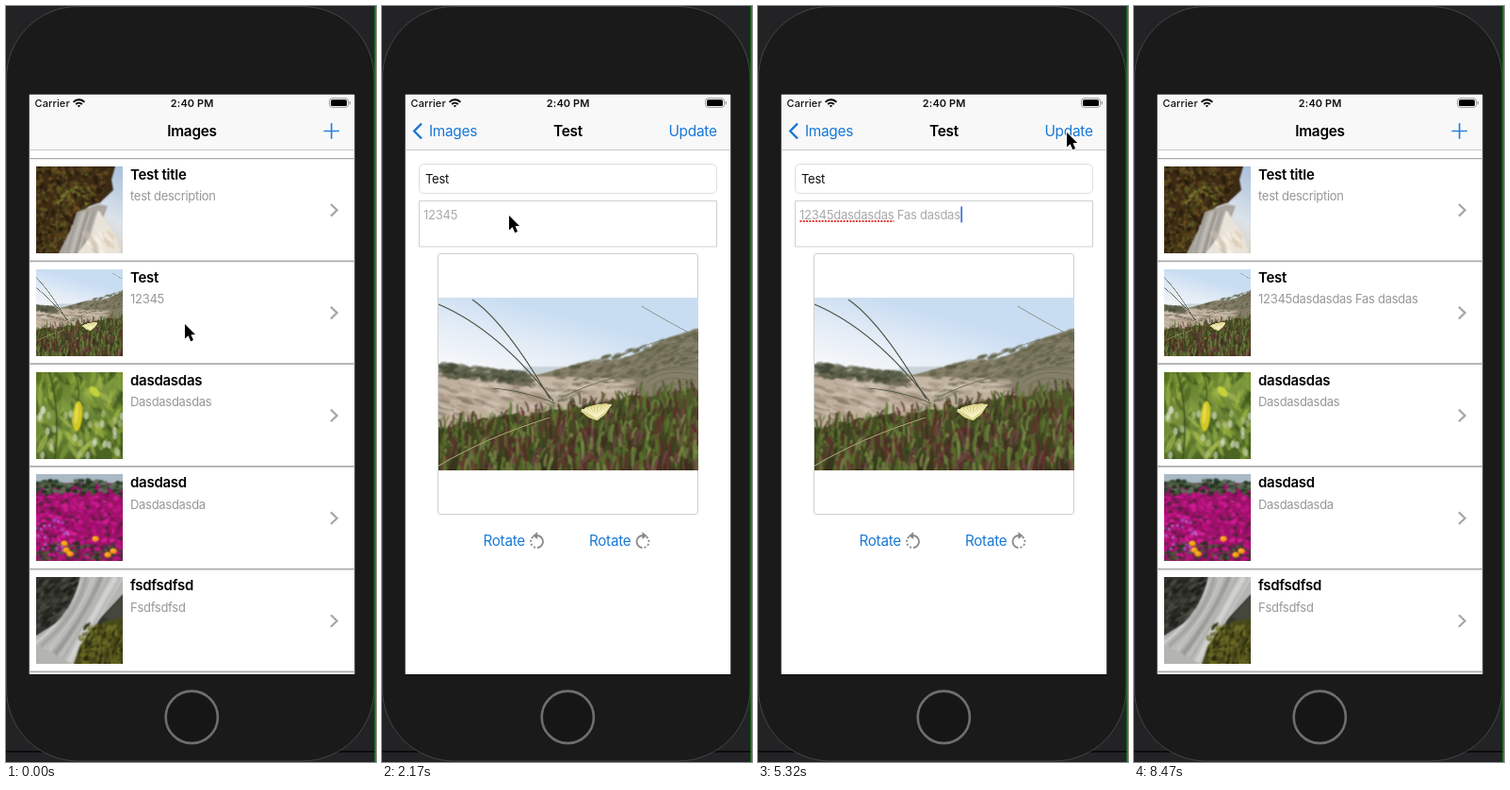
An HTML page with a canvas that plays this animation: 393x801 px, repeating every 8.54 s.

```html
<!DOCTYPE html>
<html lang="en">
<head>
<meta charset="utf-8">
<title>Image list</title>
<style>
html, body { margin: 0; width: 100%; height: 100%; overflow: hidden; background: #1a1a1a; }
canvas { display: block; width: 393px; height: 801px; }
</style>
</head>
<body>
<canvas id="stage"></canvas>
<script>
const W = 393, H = 801, LOOP = 8540;
const SX = 24.5, SY = 93.5, SW = 346, SH = 614.5, NAV = 153;
const BLUE = '#1878d6', FONT = 'Inter, "Open Sans", sans-serif';
const canvas = document.getElementById('stage');
const dpr = window.devicePixelRatio || 1;
canvas.width = W * dpr;
canvas.height = H * dpr;
const g = canvas.getContext('2d');

const clamp = v => Math.max(0, Math.min(1, v));
const mix = (a, b, k) => a + (b - a) * k;
const smooth = k => k * k * (3 - 2 * k);

function randomizer(seed) {
  return () => {
    seed = (seed * 1664525 + 1013904223) >>> 0;
    return seed / 4294967296;
  };
}

// ---------- pictures ----------
// Painted at double size; "paint" is softened, "sharp" goes on top as is.
function picture(w, h, seed, paint, sharp) {
  const make = () => {
    const c = document.createElement('canvas');
    c.width = w * 2;
    c.height = h * 2;
    return [c, c.getContext('2d')];
  };
  const [raw, p] = make(), [out, q] = make();
  const rnd = randomizer(seed);
  for (let i = 0; i < 5; i++) rnd();
  p.scale(2, 2);
  paint(p, rnd);
  q.drawImage(raw, 0, 0);
  q.filter = 'blur(1.6px)';
  q.drawImage(raw, 0, 0);
  q.filter = 'none';
  q.scale(2, 2);
  if (sharp) sharp(q);
  return out;
}

function gradient(p, x0, y0, x1, y1, colors) {
  const gr = p.createLinearGradient(x0, y0, x1, y1);
  colors.forEach((c, i) => gr.addColorStop(i / (colors.length - 1), c));
  return gr;
}

function poly(p, color, pts) {
  p.fillStyle = color;
  p.beginPath();
  for (let i = 0; i < pts.length; i += 2) p.lineTo(pts[i], pts[i + 1]);
  p.fill();
}

function blob(p, color, x, y, rx, ry, angle = 0) {
  p.fillStyle = color;
  p.beginPath();
  p.ellipse(x, y, rx, ry, angle, 0, 7);
  p.fill();
}

function blade(p, color, w, x0, y0, cx, cy, x1, y1) {
  p.strokeStyle = color;
  p.lineWidth = w;
  p.beginPath();
  p.moveTo(x0, y0);
  p.quadraticCurveTo(cx, cy, x1, y1);
  p.stroke();
}

// scatter(rnd, n, colors, draw) calls draw with a random colour
function scatter(rnd, n, colors, draw, alpha = 1) {
  for (let i = 0; i < n; i++) {
    const c = colors[rnd() * colors.length | 0];
    p_alpha = alpha;
    draw(c, i / n);
  }
}
let p_alpha = 1;

function paintDune(p, rnd) {
  p.fillStyle = gradient(p, 60, 0, 40, 76, ['#c9ddf2', '#e3ecf6', '#f5f7fa']);
  p.fillRect(0, 0, 276, 183);
  p.fillStyle = '#c9d3da';
  p.fillRect(90, 73, 90, 10);
  poly(p, '#bfb09e', [0, 76, 60, 80, 130, 82, 276, 70, 276, 183, 0, 183]);
  poly(p, '#857e69', [100, 83, 150, 70, 195, 65, 222, 54, 245, 42, 276, 33, 276, 120, 200, 98, 150, 84]);
  p.globalAlpha = 0.6;
  scatter(rnd, 340, ['#5f6247', '#77725a', '#938a74', '#4e5337', '#6b684f'], c => {
    const x = 125 + rnd() * 151, top = 77 - (x - 125) * 0.29;
    blob(p, c, x, top + rnd() * 34, 4, 1.4, -0.35);
  });
  scatter(rnd, 60, ['#cabba9', '#b09f8b', '#d3c7b7'], c => {
    blob(p, c, 95 + rnd() * 110, 86 + rnd() * 16, 9, 1.6, 0.1);
  });
  scatter(rnd, 220, ['#4c523d', '#5e624b', '#3f4633', '#737059'], c => {
    const x = rnd() * 100;
    blob(p, c, x, 69 + x * 0.11 + rnd() * 14, 4, 2);
  });
  scatter(rnd, 110, ['#cbbdab', '#a3917d', '#877a68', '#d6cabb'], c => {
    blob(p, c, rnd() * 120, 90 + rnd() * 34, 7, 1.8, 0.25);
  });
  p.globalAlpha = 1;
  const edge = x => 126 - 42 * x / 276;
  p.fillStyle = gradient(p, 0, 84, 0, 183, ['#56602f', '#454a24', '#33331b']);
  p.beginPath();
  p.moveTo(0, 183);
  for (let x = 0; x <= 276; x += 6) p.lineTo(x, edge(x) + 8 + rnd() * 6);
  p.lineTo(276, 183);
  p.fill();
  p.lineCap = 'round';
  const leaves = ['#546c2a', '#66803a', '#3d4f20', '#67352f', '#74444a', '#7d9049', '#3d2b20', '#343d1c', '#59712e', '#5c2c28'];
  scatter(rnd, 900, leaves, (c, k) => {
    const x = rnd() * 280, y = mix(edge(x) + 6, 196, k) + rnd() * 8;
    const len = 7 + 10 * k + rnd() * 6, lean = (rnd() - 0.4) * 8;
    p.globalAlpha = 0.72;
    blade(p, c, 1.8 + 2 * k, x, y, x - lean * 0.3, y - len * 0.5, x + lean, y - len);
  });
  p.globalAlpha = 1;
}

function paintReeds(p) {
  const reed = '#4d5345';
  blade(p, reed, 1.2, 0, 7, 64, 34, 122, 109);
  blade(p, reed, 1.1, 36, 2, 72, 27, 119, 108);
  blade(p, '#5f634b', 0.9, 58, 96, 90, 98, 125, 112);
  blade(p, '#a39b72', 1.1, 0, 178, 50, 148, 118, 127);
  blade(p, '#6f7154', 0.9, 276, 76, 200, 72, 130, 106);
  for (let i = 0; i < 9; i++) {
    blade(p, '#6a6d51', 0.6, 276, 40 + i * 7, 240, 38 + i * 6, 185 + i * 6, 66 + i * 4);
  }
  blade(p, '#777c66', 0.7, 216, 9, 245, 26, 276, 42);
  poly(p, '#dcd58c', [151, 120, 157, 116, 168, 113, 178, 112, 184, 113, 178, 123, 169, 130, 160, 127]);
  for (let i = 0; i < 9; i++) blade(p, '#f6f1c4', 1.2, 168, 127, 160 + i * 2, 121, 152 + i * 4, 118 - i * 0.6);
}

const dune = picture(276, 183, 7, paintDune, paintReeds);

const cliff = picture(92, 92, 11, (p, rnd) => {
  p.fillStyle = gradient(p, 92, 0, 40, 92, ['#a9c0dc', '#dce3ea', '#d8c5a8']);
  p.fillRect(0, 0, 92, 92);
  poly(p, '#3c2a15', [0, 0, 84, 0, 80, 14, 82, 25, 68, 38, 46, 46, 38, 62, 28, 92, 0, 92]);
  p.globalAlpha = 0.8;
  scatter(rnd, 520, ['#5a3f1c', '#2a1c0c', '#69501f', '#453f18', '#1f170a', '#5c5926'], c => {
    const y = rnd() * 90, lim = y < 38 ? 78 - y * 0.25 : 56 - (y - 38) * 0.5;
    blob(p, c, rnd() * lim, y, 1 + rnd() * 2.4, 0.8 + rnd() * 1.4, rnd() * 3);
  });
  p.globalAlpha = 1;
  poly(p, '#aaa69f', [47, 47, 66, 40, 76, 42, 66, 68, 74, 92, 24, 92, 34, 72]);
  p.globalAlpha = 0.5;
  scatter(rnd, 40, ['#c9c6c0', '#8f8c86', '#d8d6d1'], c => {
    const x = 34 + rnd() * 28;
    blade(p, c, 1.4, x + 8, 48, x + 2, 65, x - 5, 92);
  });
  p.globalAlpha = 1;
  poly(p, '#eae3d9', [66, 46, 74, 58, 86, 78, 90, 92, 44, 92, 58, 74]);
  p.globalAlpha = 0.5;
  scatter(rnd, 24, ['#fff8ee', '#d9c5a5', '#cfc3b5'], c => {
    blob(p, c, 52 + rnd() * 28, 72 + rnd() * 18, 6, 2, 0.9);
  });
  scatter(rnd, 40, ['#7d8a2e', '#90943a'], c => blob(p, c, 22 + rnd() * 35, 22 + rnd() * 18, 2, 1.2, rnd() * 3));
});

const foliage = picture(92, 92, 23, (p, rnd) => {
  p.fillStyle = gradient(p, 0, 0, 40, 92, ['#55701f', '#7b9440', '#4c6523']);
  p.fillRect(0, 0, 92, 92);
  p.globalAlpha = 0.6;
  scatter(rnd, 150, ['#94ae3c', '#6c8a2e', '#466120', '#aebf55', '#7f9e3e', '#3a5219'], c => {
    blob(p, c, rnd() * 92, rnd() * 92, 7 + rnd() * 5, 1.6 + rnd() * 1.6, 0.6 + rnd() * 1.7);
  });
  scatter(rnd, 34, ['#cfdcc0', '#dde4d3', '#b6c48e'], c => {
    blob(p, c, rnd() * 92, 40 + rnd() * 50, 2.5, 4);
  });
  p.globalAlpha = 1;
  blade(p, '#394f1a', 1.5, 14, 0, 26, 40, 20, 92);
  blade(p, '#40581d', 1.2, 40, 0, 48, 16, 44, 36);
  blob(p, '#c3d23b', 62, 21, 7, 4, 0.8);
  blob(p, '#d3c922', 44, 47, 5, 16, 0.08);
  blob(p, '#e6d846', 43, 44, 2, 11, 0.08);
});

const flowers = picture(92, 92, 31, (p, rnd) => {
  p.fillStyle = '#9a1368';
  p.fillRect(0, 0, 92, 92);
  p.fillStyle = '#aab9c6';
  p.fillRect(0, 0, 92, 9);
  scatter(rnd, 130, ['#2f4430', '#47593f', '#24331f', '#5d6c58'], c => {
    const x = rnd() * 92;
    blob(p, c, x, 5 + rnd() * 14 + Math.abs(x - 40) * 0.06, 3, 2);
  });
  p.globalAlpha = 0.8;
  scatter(rnd, 480, ['#c8148a', '#d62098', '#b00d78', '#820f58', '#bf1886', '#4a2636'], c => {
    blob(p, c, rnd() * 92, 20 + rnd() * 72, 1.5 + rnd() * 2, 1 + rnd() * 1.5);
  });
  scatter(rnd, 120, ['#31452a', '#4d5f3a', '#25331f', '#6b2452'], c => {
    blob(p, c, rnd() * 92, 72 + rnd() * 20, 2.4, 1.8);
  });
  scatter(rnd, 24, ['#a24ac0', '#b76ad0'], c => blob(p, c, rnd() * 34, 45 + rnd() * 38, 1.7, 1.5));
  p.globalAlpha = 1;
  for (const [x, y] of [[32, 80], [30, 73], [63, 68], [76, 85], [82, 81], [36, 84]]) {
    blob(p, '#f29a14', x, y, 3.8, 3);
    blob(p, '#ffb52c', x - 1, y - 1, 2, 1.5);
  }
});

const falls = picture(92, 92, 43, (p, rnd) => {
  p.fillStyle = '#34352f';
  p.fillRect(0, 0, 92, 92);
  p.globalAlpha = 0.7;
  scatter(rnd, 180, ['#262722', '#44443c', '#55554a', '#1c1d18'], c => {
    blob(p, c, rnd() * 50, rnd() * 55, 4, 1.8, -0.6);
  });
  p.globalAlpha = 1;
  poly(p, '#b4b4b2', [48, 0, 92, 0, 92, 18, 66, 46, 52, 62, 40, 92, 0, 92, 0, 62, 34, 40]);
  p.globalAlpha = 0.28;
  scatter(rnd, 90, ['#dededd', '#f2f2f1', '#9b9b99', '#82827f'], c => {
    const k = rnd();
    blade(p, c, 5, mix(48, 92, k), 0, mix(42, 66, k), 38, mix(0, 42, k), mix(70, 94, k));
  });
  p.globalAlpha = 1;
  poly(p, '#47491b', [92, 42, 74, 46, 58, 56, 46, 74, 40, 92, 92, 92]);
  poly(p, '#45463c', [92, 20, 72, 42, 80, 46, 92, 42]);
  p.globalAlpha = 0.7;
  scatter(rnd, 260, ['#66691f', '#34340f', '#77792a', '#26260d', '#57501f'], c => {
    const x = 46 + rnd() * 46;
    blob(p, c, x, Math.max(46, 100 - x) + 4 + rnd() * 44, 1.4, 2.8, rnd());
  });
});

// ---------- drawing helpers ----------
function text(str, x, y, size, color, opt = {}) {
  g.font = `${opt.weight || 400} ${size}px ${FONT}`;
  g.letterSpacing = (opt.track ?? -0.27) + 'px';
  g.textAlign = opt.align || 'left';
  g.fillStyle = color;
  g.fillText(str, x, y);
  return g.measureText(str).width;
}

function line(color, width, pts) {
  g.strokeStyle = color;
  g.lineWidth = width;
  g.beginPath();
  for (let i = 0; i < pts.length; i += 2) g.lineTo(pts[i], pts[i + 1]);
  g.stroke();
}

function box(x, y, w, h, r, stroke, fill) {
  g.beginPath();
  g.roundRect(x, y, w, h, r);
  if (fill) { g.fillStyle = fill; g.fill(); }
  if (stroke) { g.strokeStyle = stroke; g.lineWidth = 1; g.stroke(); }
}

function faded(alpha, draw) {
  if (alpha <= 0) return;
  g.save();
  g.globalAlpha *= alpha;
  draw();
  g.restore();
}

function shifted(dx, draw) {
  g.save();
  g.translate(dx, 0);
  draw();
  g.restore();
}

// ---------- timing ----------
const PUSH = 920, POP = 6143, RELOAD = 6650, TAP = 2250;
const ADDED = [[2500, 80, 'dasdasdas '], [3720, 78, 'Fas dasdas']];
const FINAL = '12345dasdasdas Fas dasdas';

// share of the way still to go in a critically damped spring
function spring(ms) {
  if (ms <= 0) return 1;
  const x = ms * 0.01732;
  return x > 14 ? 0 : (1 + x) * Math.exp(-x);
}

const detailShare = t => t < POP ? 1 - spring(t - PUSH) : spring(t - POP);

function typed(t) {
  let str = '12345', last = TAP;
  for (const [start, step, part] of ADDED) {
    const n = Math.max(0, Math.min(part.length, Math.floor((t - start) / step) + 1));
    if (n) last = start + (n - 1) * step;
    str += part.slice(0, n);
  }
  return { str, last };
}

const POINTER = [
  [0, 190, 337], [280, 179, 330], [1500, 179, 330], [2050, 135, 222], [4600, 135, 222],
  [5150, 328, 134], [6200, 329, 133.5], [7280, 329, 133], [7560, 345, 98], [7770, 345, 98], [7910, 342, 64]
];

function pointerAt(t) {
  for (let i = 1; i < POINTER.length; i++) {
    const [t0, x0, y0] = POINTER[i - 1], [t1, x1, y1] = POINTER[i];
    if (t < t1) {
      const k = smooth((t - t0) / (t1 - t0));
      return [mix(x0, x1, k), mix(y0, y1, k)];
    }
  }
  return null;
}

// ---------- parts ----------
function phone() {
  g.fillStyle = '#232325';
  g.fillRect(0, 0, W, H);
  line('#050505', 1.5, [0, 790, W, 790]);
  box(0.5, 0.5, 390.5, 799.5, 76, '#454547', '#1a1a1a');
  g.fillStyle = '#07a007';
  g.fillRect(391.5, 0, 1.5, H);
  g.fillStyle = '#161616';
  g.strokeStyle = '#6e6e6e';
  g.lineWidth = 2.6;
  g.beginPath();
  g.arc(197.3, 753.5, 27.6, 0, 7);
  g.fill();
  g.stroke();
}

const ROWS = [
  ['Test title', 'test description', cliff],
  ['Test', '12345', dune],
  ['dasdasdas', 'Dasdasdasdas', foliage],
  ['dasdasd', 'Dasdasdasda', flowers],
  ['fsdfsdfsd', 'Fsdfsdfsd', falls]
];

function row([title, note, img], y) {
  if (img === dune) g.drawImage(img, 108, 0, 366, 366, 32, y, 92, 92);
  else g.drawImage(img, 32, y, 92, 92);
  text(title, 132, y + 14, 15, '#000', { weight: 600 });
  text(note, 132, y + 36.3, 13, '#979797', { track: -0.29 });
}

function list(t) {
  g.fillStyle = '#fff';
  g.fillRect(SX, NAV, SW, SH);
  const k = clamp((t - RELOAD) / 280);
  ROWS.forEach((r, i) => {
    const y = 170 + i * 108.8;
    if (i === 1) {
      faded(1 - 2 * k, () => row(r, y));
      faded(k, () => row([r[0], FINAL, r[2]], y));
    } else row(r, y);
    line('#a6a6a8', 2.2, [345, y + 40, 351.6, y + 46.3, 345, y + 52.6]);
  });
  for (let i = 0; i < 6; i++) {
    const y = 161.7 + i * 108.75;
    line('#adadad', i ? 1.8 : 1.2, [SX, y, SX + SW, y]);
  }
}

function rotateIcon(x, y, dir) {
  g.save();
  g.translate(x, y);
  g.scale(dir, 1);
  g.strokeStyle = g.fillStyle = '#8a8a8c';
  g.lineWidth = 1.8;
  g.beginPath();
  g.arc(0, 0.5, 6.5, -1.6, 1.5);
  g.stroke();
  g.setLineDash([2.2, 1.9]);
  g.beginPath();
  g.arc(0, 0.5, 6.5, 1.8, 4.2);
  g.stroke();
  g.beginPath();
  g.moveTo(-4.5, -5.8);
  g.lineTo(0.6, -9.8);
  g.lineTo(0.6, -2);
  g.fill();
  g.restore();
}

function detail(t) {
  g.fillStyle = '#fff';
  g.fillRect(SX, NAV, SW, SH);
  box(39.5, 167.5, 316, 31, 5, '#dedede');
  text('Test', 46, 187.7, 13, '#111');
  box(39.5, 206.5, 316, 48.5, 0, '#cfcfcf');
  const { str, last } = typed(t);
  const width = text(str, 44, 226, 13, '#a9a9ab', { track: -0.24 });
  if (str.includes(' ')) {
    const word = g.measureText(str.split(' ')[0]).width;
    g.save();
    g.setLineDash([2, 1.3]);
    line('#e0392f', 2, [44.5, 228, 44 + word, 228]);
    g.restore();
  }
  if (t >= TAP && t < POP - 60 && (t - last) % 850 < 500) {
    g.fillStyle = '#3d76d8';
    g.fillRect(44 + width + 0.5, 212.5, 1.8, 17);
  }
  box(59.5, 262.5, 276, 276, 3, '#cecece');
  g.drawImage(dune, 60, 309, 275.5, 183.3);
  text('Rotate', 107.5, 572.3, 15.2, BLUE);
  rotateIcon(164.5, 567, 1);
  text('Rotate', 220, 572.3, 15.2, BLUE);
  rotateIcon(277, 567, -1);
}

function statusBar() {
  text('Carrier', 30.5, 107, 11, '#111', { weight: 500, track: 0.1 });
  text('2:40 PM', 197.7, 107, 11, '#111', { weight: 600, align: 'center', track: 0.1 });
  g.strokeStyle = '#000';
  g.lineWidth = 2;
  for (const r of [1.2, 4.6, 8]) {
    g.beginPath();
    g.arc(77.5, 107.3, r, -Math.PI * 0.76, -Math.PI * 0.24);
    g.stroke();
  }
  box(343.5, 97.8, 20, 9.6, 2.8, '#9a9a9a');
  box(345, 99.3, 17, 6.6, 1.5, null, '#000');
  box(364.7, 100.8, 1.4, 3.6, 0.8, null, '#9a9a9a');
}

function navBar(p) {
  g.fillStyle = '#f8f8f8';
  g.fillRect(SX, SY, SW, NAV - SY);
  line('#c9c9cb', 1, [SX, NAV - 0.5, SX + SW, NAV - 0.5]);
  const x = mix(197.5, 75.5, p ** 0.83), y = 138, mid = { align: 'center' }, bold = { align: 'center', weight: 600 };
  faded(1 - p, () => text('Images', x, y, 15.4, '#000', bold));
  faded(p, () => text('Images', x, y, 15.4, BLUE, mid));
  faded(Math.sqrt(p), () => {
    text('Test', 197.5 + (1 - p) * 151, y, 15.4, '#000', bold);
    line(BLUE, 2.4, [42, 124.5, 34.2, 132.5, 42, 140.5]);
  });
  faded(p ** 0.7, () => text('Update', 330, y, 15.4, BLUE, mid));
  faded((1 - p) ** 2, () => {
    line('#2b82d8', 1.7, [337.5, 132.5, 354, 132.5]);
    line('#2b82d8', 1.7, [345.7, 124.3, 345.7, 140.7]);
  });
}

const ARROW = [0, 0, 0, 15.5, 3.6, 12.3, 6.2, 18.2, 9, 17, 6.5, 11.3, 11, 11];

function pointer(t) {
  const pos = pointerAt(t);
  if (!pos) return;
  g.save();
  g.translate(...pos);
  g.beginPath();
  for (let i = 0; i < ARROW.length; i += 2) g.lineTo(ARROW[i], ARROW[i + 1]);
  g.closePath();
  g.lineJoin = 'round';
  g.strokeStyle = '#fff';
  g.lineWidth = 1.8;
  g.stroke();
  g.fillStyle = '#000';
  g.fill();
  g.restore();
}

function render(t) {
  g.setTransform(dpr, 0, 0, dpr, 0, 0);
  phone();
  const p = detailShare(t);
  g.save();
  g.beginPath();
  g.rect(SX, SY, SW, SH);
  g.clip();
  if (p < 0.9995) {
    shifted(-SW * 0.3 * p, () => list(t));
    g.fillStyle = `rgba(0, 8, 24, ${0.1 * p})`;
    g.fillRect(SX, NAV, SW, SH);
  }
  if (p > 0.0005) shifted(SW * (1 - p), () => detail(t));
  navBar(p);
  statusBar();
  g.restore();
  pointer(t);
}

const begin = performance.now();
function tick() {
  render((performance.now() - begin) % LOOP);
  requestAnimationFrame(tick);
}
tick();
</script>
</body>
</html>
```
